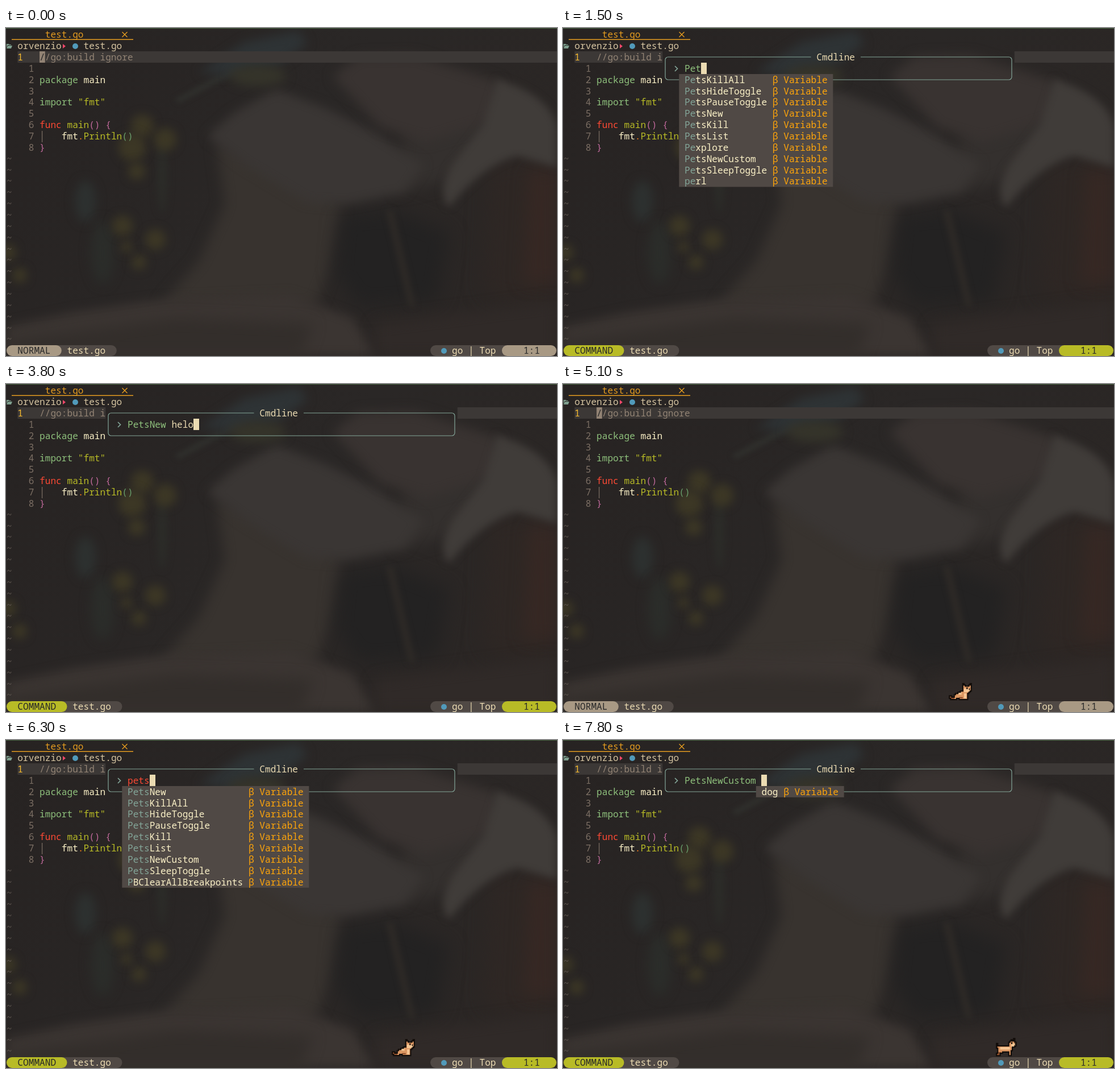
An HTML page with a canvas for the animation above (8 s loop, 970 by 577 pixels).

```html
<!DOCTYPE html>
<html lang="en">
<head>
<meta charset="utf-8">
<title>Editor pets</title>
<style>
  html, body { margin: 0; width: 100%; height: 100%; overflow: hidden; background: #282625; }
  canvas { display: block; }
</style>
</head>
<body>
<canvas id="stage" width="970" height="577"></canvas>
<script>
const LOOP = 8000, W = 970, H = 577, CW = 9.68, RH = 19.857;
const ctx = document.getElementById('stage').getContext('2d');
const C = {
  fg: '#ebdbb2', soft: '#d5c4a1', cream: '#fbf1c7', gray: '#928374', dim: '#7c6f64',
  panel: '#504945', line: '#3c3836', dark: '#282828', sand: '#a89984', lime: '#b8bb26',
  aqua: '#8ec07c', teal: '#83a598', red: '#fb4934', pink: '#c0699b', orange: '#ffa50a',
  tab: '#e39b20', blue: '#519aba'
};
const colX = c => 1 + c * CW;
const rowY = r => 1.5 + r * RH;

// Each step: time, command text (null = closed), menu query, selected entry
const STEPS = [
  [0, null], [600, ''], [1000, 'P', 'P'], [1300, 'Pe', 'P'], [1400, 'Pe', 'Pe'],
  [1500, 'Pet', 'Pe'], [1600, 'Pet', 'Pet'], [1700, 'Pets', 'Pets'], [1800, 'Petsn', 'Petsn'],
  [1900, 'Petsne', 'Petsne'], [2000, 'Petsnew', 'Petsnew'], [2100, 'Petsnew', 'Petsnew', 0],
  [2200, 'PetsNew', 'Petsnew', 0], [3800, 'PetsNew helo'], [4900, null], [5500, ''],
  [6100, 'p'], [6200, 'pe', 'pe'], [6300, 'pets', 'pets'], [6400, 'petsn', 'petsn'],
  [6500, 'petsne', 'petsne'], [6600, 'petsnew', 'petsnew'], [6700, 'PetsNew', 'petsnew', 0],
  [6900, 'PetsNewCustom', 'petsnew', 1], [7500, 'PetsNewCustom '], [7600, 'PetsNewCustom ', '']
];
const WALK_TIMES = [6900, 7000, 7200, 7300, 7500, 7600, 7700, 7800];

const NAMES = ('PetsKillAll PetsHideToggle PetsPauseToggle PetsNew PBLoad PBStore PBReload PetsKill ' +
  'PetsList Pexplore PetsNewCustom PetsSleepToggle PlenaryBustedFile PBToggleBreakpoint ' +
  'PBClearAllBreakpoints PlenaryBustedDirectory PBSetConditionalBreakpoint ' +
  'pop put pwd py3 pyx perl ppop').split(' ');

// Row, then column / text / colour triples
const CODE = [
  [0, 7, 'test.go', C.tab],
  [1, 2, 'orvenzio', C.soft, 14, 'test.go', C.soft],
  [2, 2, '1', '#fabd2f', 6, '//go:build ignore', C.gray],
  [4, 6, 'package', C.aqua, 14, 'main', C.cream],
  [6, 6, 'import', C.aqua, 13, '"fmt"', C.lime],
  [8, 6, 'func', C.red, 11, 'main', C.lime, 15, '() {', C.pink],
  [9, 10, 'fmt', C.cream, 13, '.', '#fe8019', 14, 'Println', C.lime, 21, '()', '#689d6a'],
  [10, 6, '}', C.pink]
];

function text(row, col, str, color) {
  ctx.fillStyle = color;
  ctx.fillText(str, colX(col), Math.round(rowY(row) + 15.8));
}

function box(x, y, w, h, color, radii = 0) {
  ctx.fillStyle = color;
  ctx.beginPath();
  ctx.roundRect(x, y, w, h, radii);
  ctx.fill();
}

function stroke(path, color, width = 1.2) {
  ctx.strokeStyle = color;
  ctx.lineWidth = width;
  ctx.stroke(new Path2D(path));
}

// Blurred dark photograph of a bird on old wood, painted once
function paintBackdrop() {
  const layer = new OffscreenCanvas(W, H), c = layer.getContext('2d');
  const shade = c.createLinearGradient(0, 0, W, H);
  shade.addColorStop(0, '#272322');
  shade.addColorStop(.5, '#2a2726');
  shade.addColorStop(1, '#2b2624');
  c.fillStyle = shade;
  c.fillRect(0, 0, W, H);
  const blob = (path, color, blur) => {
    c.filter = `blur(${blur}px)`;
    c.fillStyle = color;
    c.fill(new Path2D(path));
  };
  const spot = (x, y, rx, ry, color, blur = 7) => {
    c.filter = `blur(${blur}px)`;
    c.fillStyle = color;
    c.beginPath();
    c.ellipse(x, y, rx, ry, 0, 0, 7);
    c.fill();
  };
  blob('M850 240L970 220V500L840 470z', '#33282580', 18);
  blob('M920 250H970V450H910z', '#3d2a2590', 14);
  blob('M370 200L570 270 590 320 570 420 545 490H270L340 410 385 310z', '#38332f', 11);
  blob('M590 330L680 320 780 360 760 480 620 490 580 430z', '#232222', 16);
  blob('M0 525L120 500 260 480 500 470 610 510 650 577H0z', '#3b3532', 9);
  blob('M0 550L300 510 540 520 520 577H0z', '#332e2b', 12);
  blob('M650 520L970 480V577H650z', '#302a28', 12);
  blob('M700 180L860 100 850 190 770 270 690 290z', '#34302e', 12);
  blob('M354 190L400 150 475 108 560 140 650 185 735 240 700 290 600 310 530 306 420 240z', '#3a3634', 9);
  blob('M575 85L620 50 720 48 870 95 865 160 740 200 660 175z', '#393331', 10);
  blob('M865 90Q960 120 970 175V245L900 225Q840 240 780 315 757 290 785 240L840 170z', '#403c39', 7);
  blob('M668 320H682L722 490H708z', '#2d2926', 5);
  blob('M296 126L410 62 420 72 305 132z', '#2f2f2c', 4);
  blob('M340 78L420 25 515 5 530 28 480 65 390 82z', '#2e3335', 9);
  spot(443, 84, 50, 18, '#35342a', 9);
  spot(140, 305, 18, 36, '#2d3130', 9);
  spot(170, 395, 20, 55, '#2b2d2a', 10);
  spot(275, 260, 8, 65, '#2c2d29', 7);
  const flowers = [240, 172, 20, 222, 210, 24, 280, 196, 20, 230, 252, 15, 205, 348, 18,
    263, 372, 18, 234, 412, 13, 212, 385, 10, 4, 395, 14, 24, 435, 13];
  for (let i = 0; i < flowers.length; i += 3)
    spot(flowers[i], flowers[i + 1], flowers[i + 2], flowers[i + 2], '#3c3725', 8);
  return layer;
}
const backdrop = paintBackdrop();

function drawEditor(cmdOpen) {
  ctx.drawImage(backdrop, 0, 0);
  box(0, 0, W, 1, '#45613f');
  box(colX(2), 41, W, 20, C.line);
  for (const [row, ...parts] of CODE)
    for (let i = 0; i < parts.length; i += 3) text(row, parts[i], parts[i + 1], parts[i + 2]);
  for (let n = 1; n <= 8; n++) text(n + 2, 4, String(n), C.dim);
  for (let row = 11; row < 28; row++) text(row, 0, '~', '#5d554f');
  box(10, 19.6, 214, 1.3, C.tab);
  stroke('M204.5 7l9 9m0-9l-9 9', C.tab, 1.4);
  box(63, 181, 1.2, 20, C.dim);
  ctx.fillStyle = '#7fa08f';
  ctx.fill(new Path2D('M1 28h4l1 1h3v1H3L1 35zM3.5 31H11L9 36H1z'));
  ctx.fillStyle = '#f0476a';
  ctx.fill(new Path2D('M100 28l5 4-5 4z'));
  box(117, 27, 10, 10, C.blue, 5);
  if (!cmdOpen) {
    box(colX(6), 41, CW, 20, C.gray);
    text(2, 6, '/', C.dark);
  }
}

function drawStatus(mode) {
  const color = mode === 'NORMAL' ? C.sand : C.lime;
  const end = colX(mode.length + 4);
  box(50, 558, end + 47, 19, C.panel, [0, 9.5, 9.5, 0]);
  box(1, 558, end - 1, 19, color, 9.5);
  text(28, 2, mode, C.dark);
  text(28, mode.length + 5, 'test.go', C.fg);
  box(747, 558, 150, 19, C.panel, [9.5, 0, 0, 9.5]);
  box(766, 563, 10, 10, C.blue, 5);
  text(28, 81, 'go', C.fg);
  text(28, 84, '|', C.fg);
  text(28, 86, 'Top', C.fg);
  box(873, 558, 96, 19, color, 9.5);
  text(28, 94, '1:1', C.dark);
}

function drawPrompt(cmd) {
  ctx.save();
  ctx.beginPath();
  ctx.rect(colX(18), 41, colX(82) - colX(18), 60);
  ctx.clip();
  ctx.drawImage(backdrop, 0, 0);
  ctx.restore();
  stroke('M436.5 51H185a5 5 0 0 0-5 5V86a5 5 0 0 0 5 5H785a5 5 0 0 0 5-5V56a5 5 0 0 0-5-5H524', C.teal);
  text(2, 46, 'Cmdline', C.fg);
  stroke('M197 67l4.5 4.5-4.5 4.5', C.teal, 1.7);
  const [word] = cmd.split(' ');
  text(3, 22, word, /^[A-Z]/.test(word) ? C.aqua : C.red);
  text(3, 22 + word.length, cmd.slice(word.length), C.fg);
  box(Math.round(colX(22 + cmd.length)), 61, 10, 20, C.fg);
}

function matches(query) {
  if (query === '') return ['dog'];
  if (query.length === 1) return NAMES;
  const q = query.toLowerCase();
  const found = NAMES.filter(n => n.toLowerCase().startsWith(q));
  if (q.length > 3) found.sort((a, b) => (b === 'PetsNew') - (a === 'PetsNew'));
  if (q === 'pets') found.push('PBClearAllBreakpoints');
  return found;
}

function commonPrefix(a, b) {
  let n = 0;
  while (n < b.length && a[n] && a[n].toLowerCase() === b[n].toLowerCase()) n++;
  return n;
}

function drawMenu(col, query, selected) {
  const items = matches(query), scrolls = items.length > 20;
  const kind = col + Math.max(...items.map(n => n.length)) + 1;
  const left = colX(col - 1), right = colX(kind + 11 + (scrolls ? 1 : 0));
  box(left, rowY(4), right - left, items.length * RH, C.panel);
  items.forEach((name, i) => {
    const row = 4 + i, on = i === selected, n = commonPrefix(name, query);
    if (on) box(left, rowY(row), right - left, RH, C.teal);
    text(row, col, name.slice(0, n), on ? C.panel : C.teal);
    text(row, col + n, name.slice(n), on ? C.panel : C.cream);
    text(row, kind, 'β', on ? C.panel : C.orange);
    text(row, kind + 2, 'Variable', on ? C.panel : C.orange);
  });
  if (scrolls) box(right - CW, rowY(4), CW, RH * 10, C.dim);
}

// Stepped outlines in sprite pixels
const SPRITE = 2.15, INK = '#120d0a';
const SIT = 'M12 1h1v1h1v1h3V2h1V1h1v6h-1v1h-1v1h-1v5H9v-1H7v1H2v-1H1v-2h2v1h2v-2h1V9h2V8h2V7h2z';
const HEAD = 'M11 4h1V3h1V2h1v1h1V1h1v3h1v3h-1v1h-2v3h-1v4h-2';
const STRIDES = [
  HEAD + 'v-3H6v1H4v2H1v-2h1V9H1V5h1v2h9z',
  HEAD + 'v-4H5v4H3v-4H2V9H1V5h1v2h9z'
];

function drawDog(t) {
  const steps = WALK_TIMES.filter(at => t >= at).length, walking = steps > 0;
  const body = new Path2D(walking ? STRIDES[steps % 2] : SIT);
  const light = '#f6c795', brown = '#94532f';
  ctx.save();
  if (walking) ctx.translate(761 - (WALK_TIMES.length - steps) * CW, 523);
  else ctx.translate(678, 525);
  ctx.scale(SPRITE, SPRITE);
  ctx.fillStyle = '#dc9762';
  ctx.fill(body);
  ctx.save();
  ctx.clip(body);
  if (walking) {
    box(4, 8, 8, 2, light);
    box(13, 5, 4, 3, light);
    box(1, 12, 4, 3, brown);
    box(1, 5, 1, 4, brown);
  } else {
    box(13, 5, 5, 3, light);
    box(13, 9, 2, 4, light);
    box(8, 8, 3, 2, light);
    box(1, 11, 4, 3, brown);
    box(9, 12, 3, 1, brown);
  }
  ctx.restore();
  ctx.strokeStyle = INK;
  ctx.lineWidth = 1;
  ctx.stroke(body);
  box(walking ? 13 : 15, 4, 1, 1.5, INK);
  box(walking ? 16 : 17, 5, 1, 1, INK);
  ctx.restore();
}

function draw(t) {
  ctx.font = `${CW / .6}px "Noto Sans Mono", monospace`;
  const [, cmd, query, selected] = STEPS.findLast(s => t >= s[0]);
  const open = cmd !== null;
  drawEditor(open);
  // The mode label lags behind the prompt
  const command = (t >= 700 && t < 5100) || t >= 5600;
  drawStatus(command ? 'COMMAND' : 'NORMAL');
  if (open) drawPrompt(cmd);
  if (query !== undefined) drawMenu(22 + cmd.lastIndexOf(' ') + 1, query, selected);
  if (t >= 4900) drawDog(t);
}

function tick() {
  draw(performance.now() % LOOP);
  requestAnimationFrame(tick);
}
tick();
</script>
</body>
</html>
```
